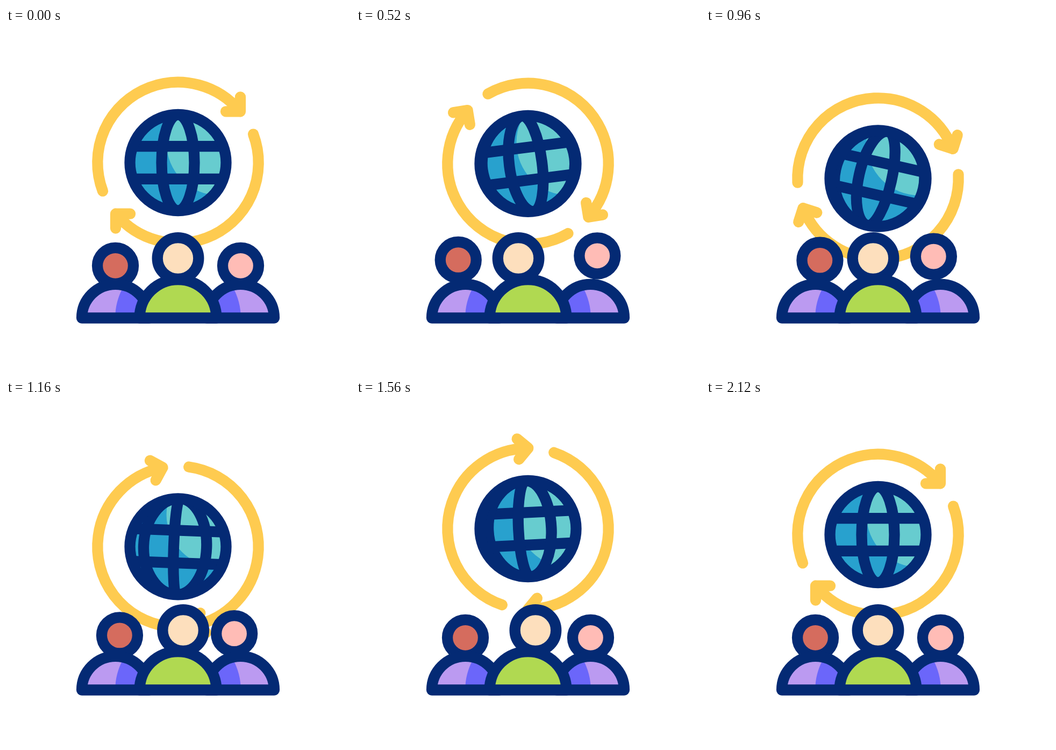
An HTML page with a canvas for the animation above (2.4 s loop, 640 by 640 pixels).

```html
<!DOCTYPE html>
<html lang="en">
<head>
<meta charset="utf-8">
<title>Global team</title>
<style>
html, body { margin: 0; width: 100%; height: 100%; overflow: hidden; background: #fff; }
canvas { display: block; width: 640px; height: 640px; }
</style>
</head>
<body>
<canvas id="stage"></canvas>
<script>
const LOOP = 2400, STEP = 20, END = 2120, TAU = Math.PI * 2, RAD = Math.PI / 180;
const NAVY = '#042a74', YELLOW = '#fecb50', BLUE = '#28a1ce', TEAL = '#67cccf';
const PURPLE = '#bb9af1', VIOLET = '#6b66fa';

// Eased swing from one turning point [ms, value] to the next, starting at rest
function swing(t, rest, ...turns) {
  let from = [0, rest];
  for (const to of turns) {
    if (t < to[0]) {
      const s = (t - from[0]) / (to[0] - from[0]);
      return from[1] + (to[1] - from[1]) * s * s * (3 - 2 * s);
    }
    from = to;
  }
  return from[1];
}

// Progress 0..1 with its speed bent by a and b
const bend = (s, a, b) => s + s * (1 - s) * (a + b * s);

const globeY = t => swing(t, 250.5, [300, 295], [720, 215.5], [1020, 287.5], [1440, 231], [1820, 267], [END, 250.5]);
const globeTilt = t => swing(t, 0, [320, -14.4], [920, 13.2], [1380, -7.6], [1780, 3.8], [END, 0]);
const globeSpin = t => 4 * bend(t / END, -0.28, 0.85);

const midX = t => 320 + swing(t, 0, [720, -22.1], [1360, 19.2], [1940, 0]);
const sideX = (t, x, out, back) => x + swing(t, 0, [400, out], [1060, back], [1400, 0]);
const sideY = (t, height) => 442.3 - height * swing(t, 0, [410, 1], [880, 1], [1380, 0]);

// Two full turns, each quick at first and slowing at its end
function arrowAngle(t) {
  const turns = Math.min(2, t / 920), done = Math.floor(turns);
  return 360 * (done + bend(turns - done, 0.1, 0.97));
}

const canvas = document.getElementById('stage');
const ctx = canvas.getContext('2d');
const scale = window.devicePixelRatio || 1;
canvas.width = canvas.height = 640 * scale;

function circle(x, y, r) {
  ctx.beginPath();
  ctx.arc(x, y, r, 0, TAU);
}

function fill(color) {
  ctx.fillStyle = color;
  ctx.fill();
}

function outline(color, width = 20.3) {
  ctx.strokeStyle = color;
  ctx.lineWidth = width;
  ctx.stroke();
}

function drawArrows(y, angle) {
  for (const turn of [0, 180]) {
    ctx.save();
    ctx.translate(320, y);
    ctx.rotate((angle + turn) * RAD);
    ctx.beginPath();
    ctx.arc(0, 0, 149.7, 159.3 * RAD, 320.6 * RAD);
    ctx.moveTo(89, -95.2);
    ctx.lineTo(116, -95.2);
    ctx.lineTo(116, -122);
    outline(YELLOW);
    ctx.restore();
  }
}

// Evenly spaced lines; those on the left follow the sphere more closely in mid-spin
function meridianX(q, spin) {
  const flat = 61 * q;
  if (q > 0) return flat;
  const round = Math.sin(spin / 4 * Math.PI);
  return flat + (90 * Math.sin(q * 40 * RAD) - flat) * round;
}

function drawGlobe(y, tilt, spin) {
  ctx.save();
  circle(320, y, 89.5);
  fill(BLUE);
  ctx.clip();
  circle(397, 213, 98.5); // the light stays in place while the globe moves
  fill(TEAL);

  ctx.translate(320, y);
  ctx.rotate(tilt * RAD);
  ctx.beginPath();
  for (const lat of [-30.3, 30.3]) {
    ctx.moveTo(-100, lat);
    ctx.lineTo(100, lat);
  }
  outline(NAVY);
  for (let start = 0.5; start > -5; start--) {
    const q = start + spin;
    if (Math.abs(q) > 2) continue;
    const x = meridianX(q, spin);
    ctx.beginPath();
    ctx.ellipse(0, 0, Math.abs(x), 89.5, 0, -Math.PI / 2, Math.PI / 2, x < 0);
    outline(NAVY);
  }
  ctx.restore();
  circle(320, y, 89.5);
  outline(NAVY);
}

function drawHead(x, y, r, color) {
  circle(x, y, r);
  fill(color);
  outline(NAVY);
}

function bodyPath(x, r) {
  ctx.beginPath();
  ctx.arc(x, 539.5, r, Math.PI, TAU);
  ctx.closePath();
}

// side: 1 shades the right half, -1 the left half
function drawBody(x, r, color, side = 0) {
  bodyPath(x, r);
  fill(color);
  if (side) {
    ctx.save();
    ctx.clip();
    ctx.translate(x, 0);
    ctx.scale(side, 1);
    ctx.beginPath();
    ctx.moveTo(-0.5, 540);
    ctx.bezierCurveTo(-0.5, 518, 4, 502, 15, 480);
    ctx.lineTo(70, 470);
    ctx.lineTo(70, 540);
    fill(VIOLET);
    ctx.restore();
    bodyPath(x, r);
  }
  outline(NAVY);
}

function draw(t) {
  const y = globeY(t);
  ctx.setTransform(scale, 0, 0, scale, 0, 0);
  ctx.fillStyle = '#fff';
  ctx.fillRect(0, 0, 640, 640);
  ctx.lineCap = ctx.lineJoin = 'round';

  drawArrows(y, arrowAngle(t));
  drawGlobe(y, globeTilt(t), globeSpin(t));
  drawHead(sideX(t, 203.5, -15.5, 10), sideY(t, 10.8), 33.5, '#d56c5e');
  drawHead(sideX(t, 436.5, 15, -15), sideY(t, 18.5), 33.5, '#ffbcb6');
  drawBody(203.7, 62.7, PURPLE, 1);
  drawBody(436.3, 62.7, PURPLE, -1);
  drawHead(midX(t), 428.5, 38.3, '#fddfbd');
  drawBody(320, 71.5, '#b0d951');
}

const began = performance.now();
function frame() {
  const t = (performance.now() - began) % LOOP;
  draw(Math.min(END, Math.floor(t / STEP) * STEP));
  requestAnimationFrame(frame);
}
frame();
</script>
</body>
</html>
```
